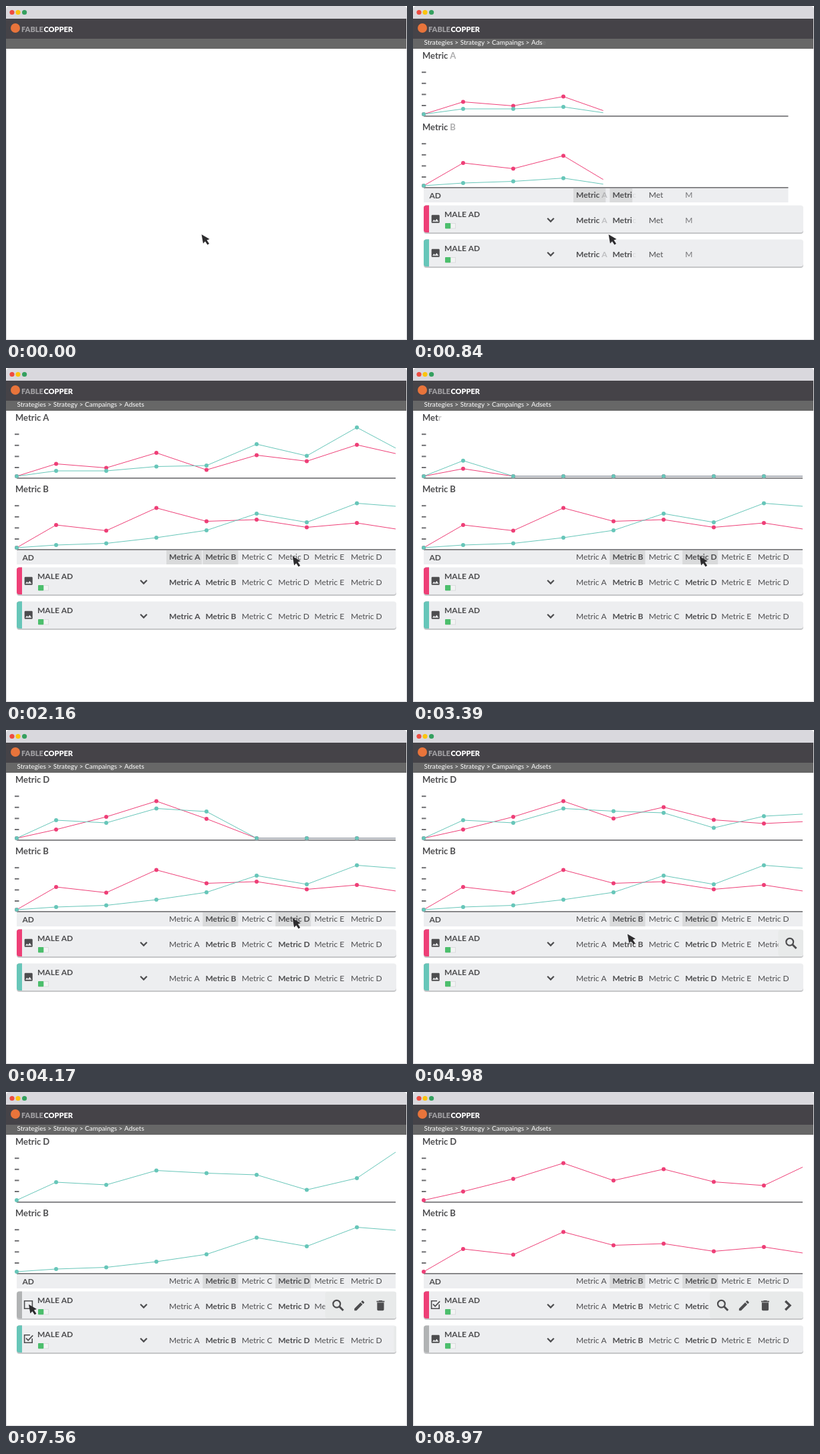
An HTML page with a canvas for the animation above (9 s loop, 600 by 500 pixels).

```html
<!DOCTYPE html>
<html lang="en">
<head>
<meta charset="utf-8">
<title>Ad metrics dashboard</title>
<style>
  html, body { margin: 0; width: 100%; height: 100%; overflow: hidden; background: #fff; }
  canvas { display: block; }
</style>
</head>
<body>
<canvas id="stage" width="600" height="500"></canvas>
<script>
const ctx = document.getElementById('stage').getContext('2d');
const LOOP = 9000;
const PINK = '#ee3f77', TEAL = '#67c6b9', DARK = '#4d4d4f', CARD = '#edeef0';

const SWAP = 2670, CLICK_TEAL = 6420, CLICK_PINK = 7770;
const METRICS = ['A', 'B', 'C', 'D', 'E', 'D'];
const ROW_Y = [299, 350];

// Point heights above each chart's base line, left to right.
const SERIES = {
  A: { pink: [18.5, 12.5, 35, 9.5, 31.5, 22.5, 47, 30], teal: [8, 8, 14.5, 16, 48, 30.5, 73, 33] },
  B: { pink: [34, 25.5, 59.5, 39.5, 42, 30.5, 37, 25.4], teal: [4, 6.5, 15, 26, 51, 38, 66.5, 60.7] },
  D: { pink: [13, 32, 55.5, 29.5, 46.5, 27.5, 22, 57.6], teal: [27, 23, 44.5, 40.5, 38, 15.5, 33, 83.4] }
};

const ICONS = {
  image: new Path2D('M21 19V5c0-1.1-.9-2-2-2H5c-1.1 0-2 .9-2 2v14c0 1.1.9 2 2 2h14c1.1 0 2-.9 2-2zM8.5 13.5l2.5 3 3.5-4.5 4.5 6H5z'),
  pencil: new Path2D('M3 17.25V21h3.75L17.8 9.94l-3.75-3.75zM20.7 7.04a1 1 0 0 0 0-1.41l-2.34-2.34a1 1 0 0 0-1.41 0l-1.83 1.83 3.75 3.75z'),
  trash: new Path2D('M6 19c0 1.1.9 2 2 2h8c1.1 0 2-.9 2-2V7H6zM19 4h-3.5l-1-1h-5l-1 1H5v2h14z'),
  cursor: new Path2D('M0 0L12 7 7.9 8.6 11.4 13.8 8.9 15.4 5.4 10.2 2.4 13.4z')
};

const ramp = (t, start, length) => Math.min(1, Math.max(0, (t - start) / length));
const easeOut = p => 1 - (1 - p) ** 2;
const easeInOut = p => p < .5 ? 2 * p * p : 1 - 2 * (1 - p) ** 2;
const mix = (a, b, p) => a + (b - a) * p;

function rect(x, y, w, h, color, radius = 0) {
  ctx.fillStyle = color;
  ctx.beginPath();
  ctx.roundRect(x, y, w, h, radius);
  ctx.fill();
}

function circle(x, y, r, color) {
  ctx.fillStyle = color;
  ctx.beginPath();
  ctx.arc(x, y, r, 0, 2 * Math.PI);
  ctx.fill();
}

function stroke(path, width, color = DARK) {
  ctx.lineWidth = width;
  ctx.strokeStyle = color;
  ctx.stroke(new Path2D(path));
}

function icon(name, x, y, scale) {
  ctx.save();
  ctx.translate(x, y);
  ctx.scale(scale, scale);
  ctx.translate(-12, -12);
  ctx.fillStyle = DARK;
  ctx.fill(ICONS[name]);
  ctx.restore();
}

function withAlpha(alpha, draw) {
  if (alpha <= 0) return;
  ctx.save();
  ctx.globalAlpha *= alpha;
  draw();
  ctx.restore();
}

// Shows the text up to a share of its letters; the newest letter is fading in.
function type(text, x, y, size, weight, color, share = 1) {
  ctx.font = `${weight} ${size}px Lato, sans-serif`;
  ctx.fillStyle = color;
  const count = Math.floor(text.length * share + 1e-6);
  ctx.fillText(text.slice(0, count), x, y);
  const next = text[count];
  if (next) {
    const left = x + ctx.measureText(text.slice(0, count + 1)).width - ctx.measureText(next).width;
    withAlpha(text.length * share - count, () => ctx.fillText(next, left, y));
  }
}

function drawWindow(t) {
  rect(0, 0, 600, 500, '#fff');
  rect(0, 0, 600, 24, '#d9d8dd', [5, 5, 0, 0]);
  circle(9, 9.5, 3.6, '#ee4b40');
  circle(18, 9.5, 3.6, '#fbc40e');
  circle(27.6, 9.5, 3.6, '#34a05f');
  rect(0, 19, 600, 30, '#454348');
  rect(0, 49, 600, 15, '#676767');
  rect(0, 64, 1, 436, '#d9d9dc');
  rect(599, 19, 1, 481, '#d9d9dc');
  rect(0, 499, 600, 1, '#d9d9dc');
  circle(14, 33, 7, '#e8743b');
  type('FABLE', 23, 39, 11, 900, '#a09fa2');
  type('COPPER', 56.5, 39, 11, 900, '#fff');
  type('Strategies  >  Strategy  >  Campaings  >  Adsets'.replace(/ {2}/g, ' '),
    16.5, 58, 10, 400, '#fff', ramp(t, 30, 870));
}

function drawSeries(heights, base, color) {
  const points = [[16, base], ...heights.map((h, i) => [75 * (i + 1), base - h])];
  ctx.strokeStyle = color;
  ctx.lineWidth = 1;
  ctx.beginPath();
  points.forEach(([x, y]) => ctx.lineTo(x, y));
  ctx.stroke();
  points.forEach(([x, y]) => circle(x, y, 3, color));
}

function drawChart(t, base, metric, start, drop, titleShare, shown) {
  type('Metric ' + metric, 14, base - 83.5, 13, 700, DARK, titleShare);
  for (let i = 0; i < 4; i++) {
    withAlpha(ramp(t, 120 + 60 * i, 200), () => rect(13, base - 14 - 16.6 * i, 6.5, 2, '#6f6f72'));
  }
  rect(16, base + 2, 567 * ramp(t, 30, 843), 1.7, '#77777a');

  const rise = h => h.map((v, i) => v * easeOut(ramp(t, start + 240 * i, 240)) * (1 - drop));
  ctx.save();
  ctx.beginPath();
  ctx.rect(10, base - 90, 6 + 567 * ramp(t, 30, 1712), 100);
  ctx.clip();
  if (t >= 30) {
    for (const [name, color] of [['pink', PINK], ['teal', TEAL]]) {
      withAlpha(shown[name], () => drawSeries(rise(SERIES[metric][name]), base, color));
    }
  }
  ctx.restore();
}

function drawCharts(t, shown) {
  const swapped = t >= 3180;
  const title = swapped ? ramp(t, 3180, 510)
    : ramp(t, 30, 870) * (1 - ramp(t, SWAP - 30, 540));
  const drop = swapped ? 0 : easeInOut(ramp(t, SWAP - 30, 540));
  drawChart(t, 162, swapped ? 'D' : 'A', swapped ? 3240 : 240, drop, title, shown);
  drawChart(t, 269, 'B', 240, 0, ramp(t, 30, 870), shown);
}

const columnShare = (t, i) => ramp(t, 240 + 180 * i, 660);
const isActive = (t, i) => i === 1 || i === (t < SWAP ? 0 : 3);

function drawColumns(t, y) {
  METRICS.forEach((m, i) =>
    type('Metric ' + m, 244 + 54.4 * i, y, 12, isActive(t, i) ? 700 : 400, DARK, columnShare(t, i)));
}

function drawTableHead(t) {
  rect(16, 273, 567 * ramp(t, 30, 843), 21, CARD);
  METRICS.forEach((m, i) => {
    if (isActive(t, i)) rect(240 + 54.4 * i, 273, 53 * columnShare(t, i), 21, '#d9dadb');
  });
  type('AD', 24.5, 287.5, 12, 700, DARK, ramp(t, 30, 500));
  drawColumns(t, 287.3);
}

function drawPane(share) {
  ctx.save();
  ctx.translate(584 - 140 * share, 0);
  rect(0, 0, 142, 40, '#e8eaea', [4, 0, 0, 4]);
  ctx.lineCap = 'butt';
  stroke('M22.8 18.2a5.4 5.4 0 1 1 -10.8 0a5.4 5.4 0 1 1 10.8 0', 2.2);
  stroke('M21 21.8L27.2 28', 3);
  icon('pencil', 51.3, 20.8, .83);
  icon('trash', 83, 20.6, .85);
  stroke('M113.2 14L120 20.6 113.2 27.2', 3.4);
  ctx.restore();
}

function drawSelector(checked, hovered) {
  if (checked) {
    stroke('M39.2 19v6.3H27.6V13.7H36', 1.6);
    stroke('M30 18.6l3.2 3.2L40.2 14.4', 1.7);
  } else if (hovered) {
    stroke('M27.6 13.7h11.8v11.6H27.6z', 1.6);
  } else {
    icon('image', 33.7, 19.7, .67);
  }
}

function drawRow(t, row, color, shown, pane, checked, cursor) {
  const top = ROW_Y[row];
  const hovered = Math.abs(cursor.x - 33.5) < 8 && Math.abs(cursor.y - top - 19.5) < 8;
  withAlpha(ramp(t, 150 + 150 * row, 300), () => {
    ctx.save();
    ctx.translate(0, top);
    rect(16, 1, 568, 41, '#c5c6c8', 4);
    ctx.beginPath();
    ctx.roundRect(16, -.5, 568, 40.5, 4);
    ctx.clip();
    rect(16, -1, 568, 42, CARD);
    rect(16, -1, 8, 42, '#b1b3b4');
    withAlpha(shown, () => rect(16, -1, 8, 42, color));
    drawSelector(checked, hovered);
    type('MALE AD', 47, 17.3, 12, 700, DARK);
    rect(48.5, 26.5, 15, 7.5, '#f3f4f4');
    ctx.lineWidth = 1;
    ctx.strokeStyle = '#dcdddf';
    ctx.strokeRect(48.5, 26.5, 15, 7.5);
    rect(48, 26, 8.3, 8.3, '#4cbe6c', 1);
    stroke('M201.2 18.8L206 23.6 210.8 18.8', 2.2);
    drawColumns(t, 25.8);
    if (pane > 0) drawPane(pane);
    ctx.restore();
  });
}

function cursorAt(t) {
  const stops = [
    [0, 292.6, 342], [930, 292.6, 342], [1860, 428.8, 282], [4530, 428.8, 282],
    [6180, 34, 368], [7140, 34, 368], [7500, 34, 318], [LOOP, 34, 318]
  ];
  const i = stops.findIndex(s => t < s[0]);
  const [t0, x0, y0] = stops[i - 1], [t1, x1, y1] = stops[i];
  const p = (t - t0) / (t1 - t0);
  return { x: mix(x0, x1, p), y: mix(y0, y1, p) };
}

function drawCursor(t, { x, y }) {
  if (t >= 8970) return;
  const pressed = [SWAP, CLICK_TEAL, CLICK_PINK].some(c => t >= c && t < c + 60);
  ctx.save();
  ctx.translate(x, y);
  if (pressed) ctx.scale(.88, .88);
  ctx.fillStyle = '#2d2c2e';
  ctx.fill(ICONS.cursor);
  ctx.restore();
}

function draw(t) {
  const cursor = cursorAt(t);
  const fade = click => ramp(t, click - 30, 90);
  const slide = start => easeInOut(ramp(t, start, 330));
  const shown = {
    pink: 1 - fade(CLICK_TEAL) + fade(CLICK_PINK),
    teal: 1 - fade(CLICK_PINK)
  };
  drawWindow(t);
  drawCharts(t, shown);
  drawTableHead(t);
  drawRow(t, 0, PINK, shown.pink, slide(4860) - slide(5643) + slide(7345), t >= CLICK_PINK, cursor);
  drawRow(t, 1, TEAL, shown.teal, slide(5840) - slide(7270),
    t >= CLICK_TEAL && t < CLICK_PINK, cursor);
  drawCursor(t, cursor);
}

const began = performance.now();
function frame() {
  draw((performance.now() - began) % LOOP);
  requestAnimationFrame(frame);
}
frame();
</script>
</body>
</html>
```
